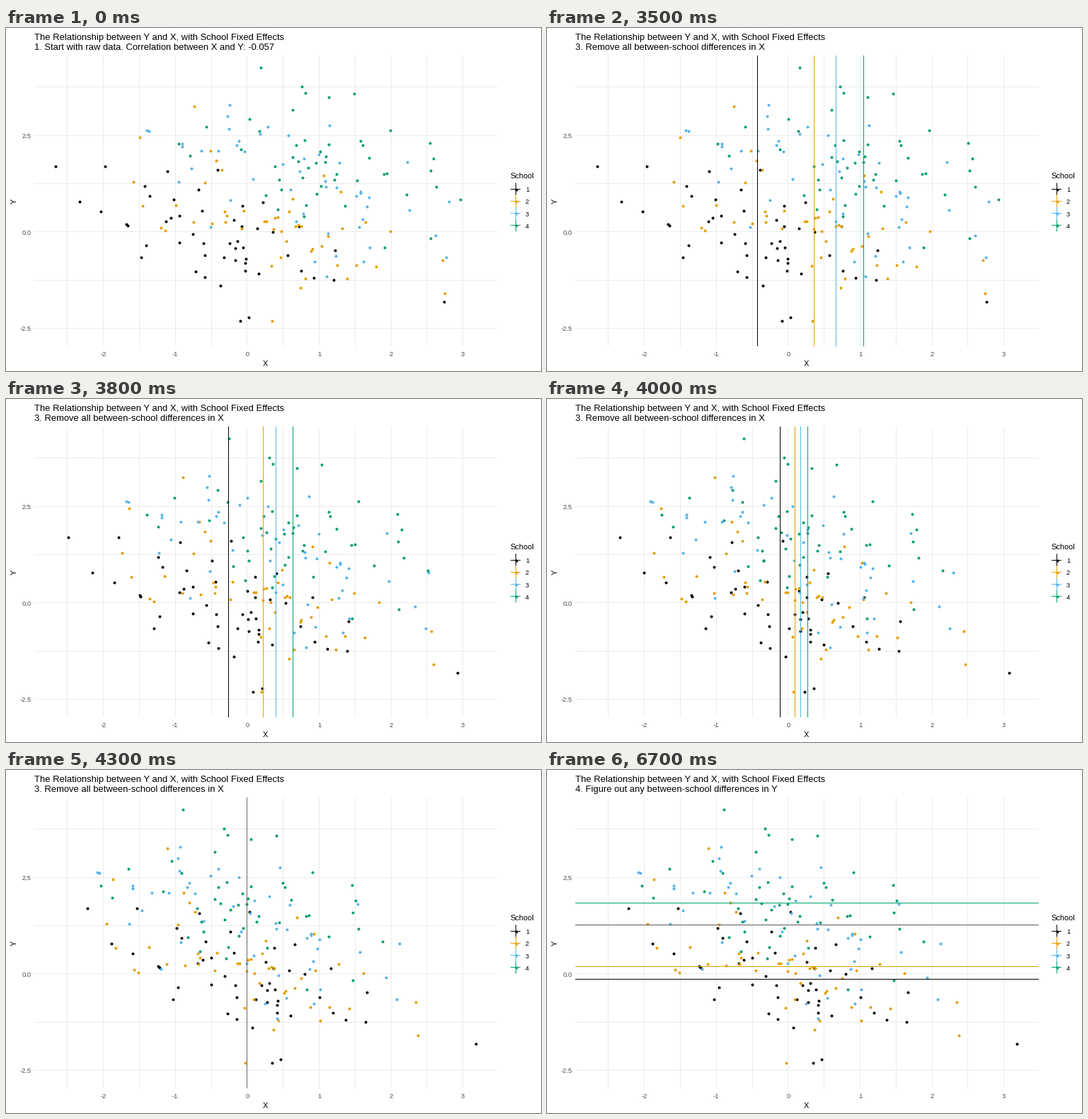
A matplotlib script that plays this animation: 756 by 486 pixels, repeating every 8000 ms.

```python
import numpy as np
import matplotlib.pyplot as plt
from matplotlib.animation import FuncAnimation

WIDTH, HEIGHT, DPI = 756, 486, 72
LEFT, RIGHT, TOP, BOTTOM = 40, 695, 39, 451
INTERVAL, FRAMES = 100, 80
MOVE_START, MOVE_STEPS = 34, 9
GRID, MUTED, TICK = "#EBEBEB", "#666666", "#4D4D4D"
COLORS = ["#000000", "#E69F00", "#56B4E9", "#009E73"]
PER_SCHOOL = 50
SLOPE, NOISE, REACH = -0.55, 0.9, 2.2
MEAN_X = [-0.443, 0.374, 0.689, 1.083]
MEAN_Y = [-0.14, 0.19, 1.27, 1.84]

TITLE = "The Relationship between Y and X, with School Fixed Effects"
STEPS = [
    (0, "1. Start with raw data. Correlation between X and Y: -0.057"),
    (5, "2. Figure out any between-school differences in X"),
    (35, "3. Remove all between-school differences in X"),
    (64, "4. Figure out any between-school differences in Y"),
]

# The extreme observations that outline each school's cloud.
EXTREMES = [
    [(-2.67, 1.70), (2.74, -1.81), (-0.10, -2.30)],
    [(-0.74, 3.26), (2.72, -0.74), (0.35, -2.30)],
    [(-1.40, 2.63), (2.81, 0.78), (1.10, -1.15)],
    [(0.19, 4.25), (2.96, 0.83), (-0.95, 2.28)],
]

rng = np.random.default_rng(7)


def to_px(x):
    return 340.8 + 101.6 * np.asarray(x)


def to_py(y):
    return 288.9 - 54.7 * np.asarray(y)


def school_data(extremes, mean):
    """Random cloud sloping downward, centred so the school means are exact."""
    extremes = np.array(extremes)
    count = PER_SCHOOL - len(extremes)
    dx = rng.normal(size=count).clip(-REACH, REACH)
    dy = (SLOPE * dx + NOISE * rng.normal(size=count)).clip(-REACH, REACH)
    cloud = np.column_stack([dx, dy])
    center = (PER_SCHOOL * np.array(mean) - extremes.sum(axis=0)) / count
    return np.vstack([extremes, cloud - cloud.mean(axis=0) + center])


plt.rcParams["font.family"] = "Liberation Sans"
fig = plt.figure(figsize=(WIDTH / DPI, HEIGHT / DPI), dpi=DPI, facecolor="white")
ax = fig.add_axes([0, 0, 1, 1])
ax.set_xlim(0, WIDTH)
ax.set_ylim(HEIGHT, 0)
ax.axis("off")


def pixel(value):
    return np.floor(value) + 0.5


def segment(xs, ys, color, z):
    return ax.plot(xs, ys, color=color, lw=1, zorder=z, snap=False,
                   solid_capstyle="butt")[0]


def vline(x, color, top=TOP, bottom=BOTTOM, z=1):
    return segment([pixel(x)] * 2, [top, bottom], color, z)


def hline(y, color, left=LEFT, right=RIGHT, z=1):
    return segment([left, right], [pixel(y)] * 2, color, z)


def dots(x, y, color):
    return ax.plot(x, y, "o", color=color, ms=4, mew=0, zorder=3)[0]


def label(x, y, text, size, color="black", **kwargs):
    return ax.text(x, y, text, fontsize=size, color=color, **kwargs)


for x in np.arange(-2.5, 3.1, 0.5):
    vline(to_px(x), GRID)
for y in np.arange(-2.5, 3.8, 1.25):
    hline(to_py(y), GRID)
for x in range(-2, 4):
    label(to_px(x), 465, str(x), 9.4, TICK, ha="center")
for y in (-2.5, 0.0, 2.5):
    label(35.5, to_py(y) + 3.7, f"{y:.1f}", 9.4, TICK, ha="right")

label(39.5, 17, TITLE, 12.95)
subtitle = label(39.5, 31, "", 12.95)
label(366.5, 479, "X", 11, ha="center")
label(11.5, 245, "Y", 11, ha="center", va="center", rotation=90)

label(712, 213, "School", 11)
for n, color in enumerate(COLORS):
    y = 228 + 17.28 * n
    vline(720, color, y - 8.6, y + 8.6)
    hline(y, color, 713, 727)
    dots([720.5], [pixel(y)], color)
    label(734, y + 4, str(n + 1), 9.4)

schools = [school_data(e, m) for e, m in zip(EXTREMES, zip(MEAN_X, MEAN_Y))]
clouds = [dots(to_px(s[:, 0]), to_py(s[:, 1]), c) for s, c in zip(schools, COLORS)]
x_means = [vline(to_px(m), c, z=4) for m, c in zip(MEAN_X, COLORS)]
y_means = [hline(to_py(m), c, z=4)
           for m, c in zip(MEAN_Y, [*COLORS[:2], MUTED, COLORS[3]])]


def update(i):
    step = np.clip(i - MOVE_START, 0, MOVE_STEPS)
    shift = (1 - np.cos(np.pi * step / MOVE_STEPS)) / 2
    subtitle.set_text([text for start, text in STEPS if i >= start][-1])
    for n, mean in enumerate(MEAN_X):
        clouds[n].set_xdata(to_px(schools[n][:, 0] - shift * mean))
        x_means[n].set_xdata([pixel(to_px(mean * (1 - shift)))] * 2)
        x_means[n].set_color(MUTED if step == MOVE_STEPS else COLORS[n])
        x_means[n].set_visible(8 <= i < 64)
        y_means[n].set_visible(i >= 67)
    return [subtitle, *clouds, *x_means, *y_means]


anim = FuncAnimation(fig, update, frames=FRAMES, interval=INTERVAL,
                     repeat=True, repeat_delay=0, blit=False)
plt.show()
```
